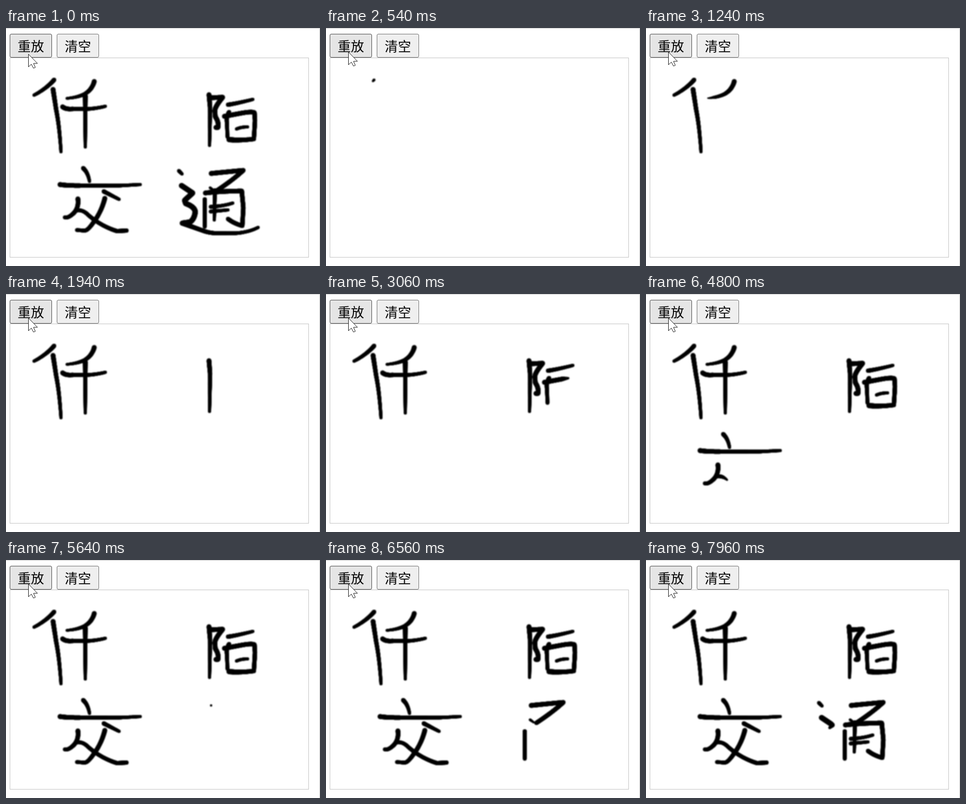
An HTML page with a canvas for the animation above (8 s loop, 594 by 450 pixels).

```html
<!DOCTYPE html>
<html lang="zh">
<head>
<meta charset="utf-8">
<style>
  html, body { margin: 0; width: 100%; height: 100%; overflow: hidden; background: #fff; }
  body { position: relative; }
  div, canvas, svg { position: absolute; box-sizing: border-box; }
  .edge { left: 0; top: 0; width: 594px; height: 450px; border: solid #ccc; border-width: 1px 1px 0 0; }
  .board { left: 7px; top: 56px; width: 566px; height: 378px; border: 1px solid #c6c6c6; }
  .button {
    top: 11px; width: 80px; height: 45px; border: 1px solid #767676; border-radius: 3px;
    background: #efefef; color: #000; text-align: center; overflow: hidden;
    font: 350 25px/42px "Noto Sans CJK SC", "Noto Sans CJK", sans-serif;
  }
  .hover { background: #e5e5e5; border-color: #4f4f4f; }
  canvas { left: 0; top: 0; filter: blur(.8px); }
  #cursor { left: 40px; }
  #strokes { left: 0; top: 0; overflow: hidden; }
</style>
</head>
<body>
<div class="edge"></div>
<div class="button hover" style="left:7px">重放</div>
<div class="button" style="left:96px">清空</div>
<div class="board"></div>
<canvas width="594" height="450"></canvas>
<svg id="cursor" width="22" height="32">
  <path d="M2.5 .5V24.500L8 19.500L12 27L15.500 25.500L12 18H19.500Z" fill="#fff" stroke="#222"/>
</svg>

<!-- data-t: start and end in ms, data-w: first and last brush width -->
<svg id="strokes" width="0" height="0">
  <path data-t="520 780" data-w="8 6" d="M91 98Q76 115 53 127"/>
  <path data-t="820 1040" data-w="9 6" d="M89 116L95 155Q101 185 104 234"/>
  <path data-t="1080 1245" data-w="9 5" d="M167 101Q163 116 150 124Q138 131 115 133"/>
  <path data-t="1300 1460" data-w="9 6" d="M107 149Q113 154 125 153H155Q172 152 188 148"/>
  <path data-t="1510 1680" data-w="9 6" d="M150 128L150 225"/>

  <path data-t="1740 1920" data-w="9 6" d="M384 126L386 150L385 222"/>
  <path data-t="1965 2400" data-w="9 9" d="M386 132L410 131Q396 148 395 156L396 168Q403 178 401 188L397 188"/>
  <path data-t="2450 2620" data-w="8 6" d="M420 145Q435 143 467 135"/>
  <path data-t="2670 2870" data-w="8 7" d="M422 159Q416 168 418 180L419 206"/>
  <path data-t="2930 3230" data-w="9 8" d="M413 167L440 162Q465 157 470 160L471 175L469 209"/>
  <path data-t="3400 3520" data-w="6 6" d="M436 191Q445 187 457 187"/>
  <path data-t="3640 3900" data-w="10 8" d="M422 211Q440 213 469 210"/>

  <path data-t="3960 4100" data-w="8 6" d="M146 265Q155 273 158 290"/>
  <path data-t="4150 4370" data-w="9 6" d="M102 296Q115 298 140 298H215L254 296"/>
  <path data-t="4420 4670" data-w="9 7" d="M136 323Q138 340 128 350T111 358"/>
  <path data-t="4740 5080" data-w="7 8" d="M134 345Q145 343 155 353Q180 375 210 384L228 383"/>
  <path data-t="5140 5260" data-w="8 6" d="M185 309L214 324"/>
  <path data-t="5320 5560" data-w="9 7" d="M187 322Q180 349 165 368Q154 384 148 383L134 382"/>

  <path data-t="5650 6200" data-w="9 8" d="M388 275L449 269Q430 287 398 308"/>
  <path data-t="6280 6350" data-w="5 4" d="M386 302L393 307"/>
  <path data-t="6390 6550" data-w="8 7" d="M376 324L376 376"/>
  <path data-t="6600 7240" data-w="9 8" d="M377 312Q400 309 446 308L449 340L447 374Q432 370 420 361"/>
  <path data-t="7290 7400" data-w="7 6" d="M387 338Q410 337 429 331"/>
  <path data-t="7430 7520" data-w="7 6" d="M387 347L420 344"/>
  <path data-t="7560 7680" data-w="8 6" d="M395 307L394 363"/>
  <path data-t="7740 7800" data-w="7 6" d="M327 270L333 276"/>
  <path data-t="7840 8250" data-w="10 10" d="M332 298L353 312L338 326L340 332Q357 338 358 348Q356 362 348 367L334 369"/>
  <path data-t="8320 8700" data-w="9 6" d="M333 369L372 383Q385 388 400 388H435Q460 386 477 377"/>
</svg>

<script>
const LOOP = 8000, CLEAR = 470, TICK = 70;
const ctx = document.querySelector('canvas').getContext('2d');
const cursor = document.getElementById('cursor');

const strokes = [...document.querySelectorAll('#strokes path')].map(path => {
  const pair = key => path.dataset[key].split(' ').map(Number);
  const [start, end] = pair('t'), [w0, w1] = pair('w');
  const length = path.getTotalLength(), count = Math.ceil(length * 2);
  const dots = Array.from({ length: count + 1 }, (_, i) => {
    const { x, y } = path.getPointAtLength(length * i / count);
    return { x, y, r: (w0 + (w1 - w0) * i / count) / 2 };
  });
  return { start, end, dots };
});

function drawStroke({ start, end, dots }, time) {
  if (time < start) return;
  const progress = Math.min(1, (time - start) / (end - start));
  const last = Math.floor(progress * (dots.length - 1));
  for (let i = 0; i <= last; i++) {
    // the tip stays thin while the pen is moving
    const tip = progress < 1 ? Math.min(1, 0.5 + (last - i) / 50) : 1;
    ctx.beginPath();
    ctx.arc(dots[i].x, dots[i].y, dots[i].r * tip, 0, 7);
    ctx.fill();
  }
}

function render(now) {
  const t = now % LOOP;
  const ticks = Math.floor((t - CLEAR + 10) / TICK);
  const time = t < CLEAR ? Infinity : CLEAR + ticks * TICK;
  ctx.clearRect(0, 0, 594, 450);
  for (const stroke of strokes) drawStroke(stroke, time);
  cursor.style.top = (t < 70 ? 49 : t < 140 ? 47 : 45) + 'px';
  requestAnimationFrame(() => render(performance.now() - origin));
}

const origin = performance.now();
render(0);
</script>
</body>
</html>
```
